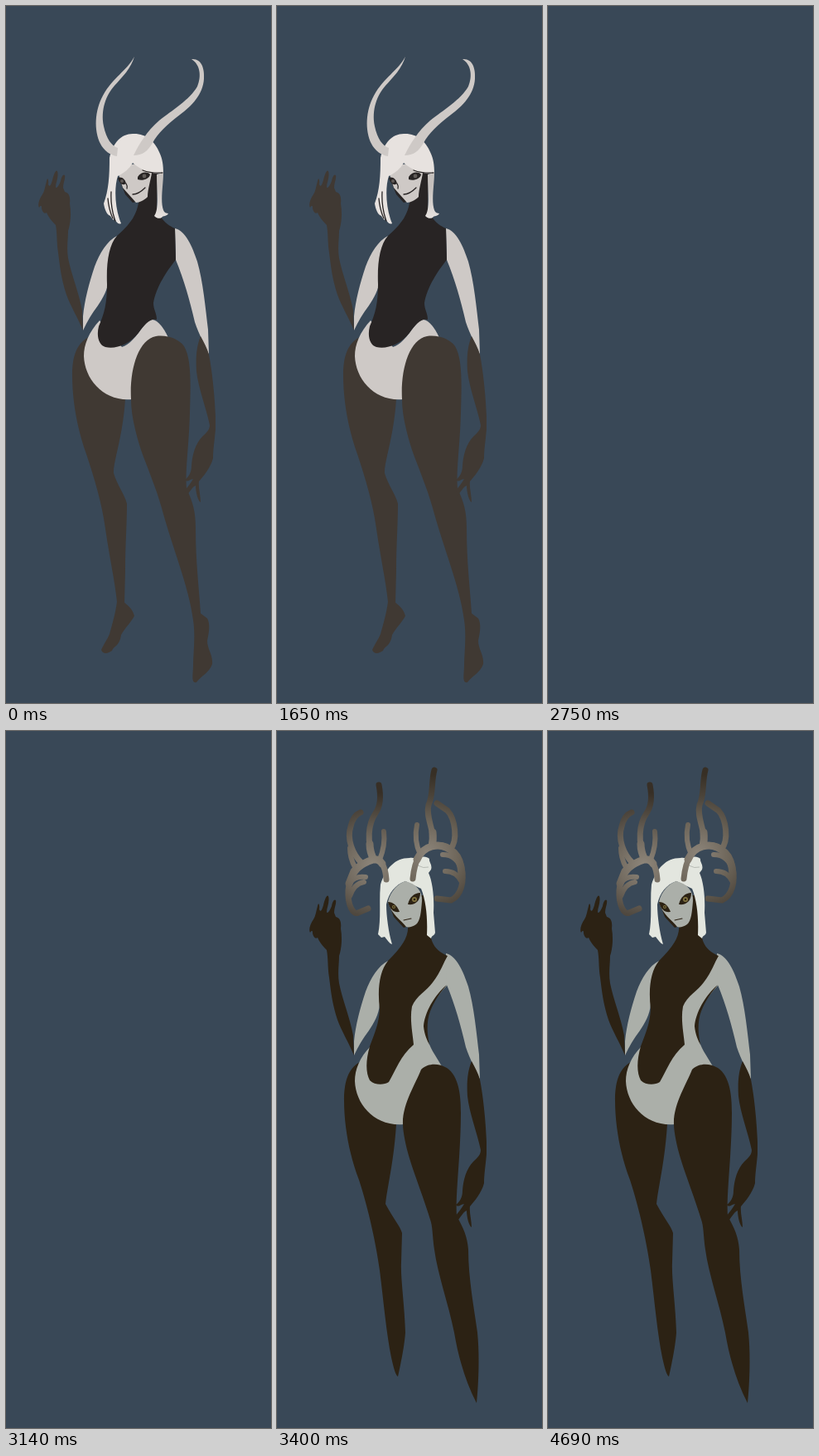
These frames come from a looping animation (320x840 px, 5550 ms). An HTML page:

```html
<!DOCTYPE html>
<html lang="en">
<head>
<meta charset="utf-8">
<title>Two forms</title>
<style>
  html, body { margin: 0; width: 100%; height: 100%; overflow: hidden; background: #394857; }
  svg { display: block; width: 100%; height: 100%; }
  .limb { fill: var(--limb); }
  .skin { fill: var(--skin); }
  .hair { fill: var(--hair); }
  .torso { fill: var(--torso); }
  .line { fill: none; stroke: var(--torso); stroke-linecap: round; }
  .horned {
    --limb: #403933; --skin: #cec9c6; --hair: #e7e2df; --torso: #282424;
    animation: first 5550ms step-end infinite;
  }
  .antlered {
    --limb: #2c2214; --skin: #abafa9; --hair: #e3e6df; --torso: #2c2214;
    animation: second 5550ms step-end infinite;
  }
  .antlers { fill: none; stroke-width: 7; stroke-linecap: round; stroke-linejoin: round; }
  .root { stroke-width: 9; }
  .twig { stroke-width: 6; }
  /* Hard cuts at 2750 ms and 3400 ms */
  @keyframes first { 0% { visibility: visible; } 49.5495%, 100% { visibility: hidden; } }
  @keyframes second { 0% { visibility: hidden; } 61.2613%, 100% { visibility: visible; } }
</style>
</head>
<body>
<svg viewBox="0 0 320 840">
  <defs>
    <g id="arms">
      <path class="skin" d="M134 277C122 283 113 298 107 314C100 335 95 354 93 374L93 391C98 380 104 370 111 361C117 352 123 342 124 329L130 290Z"/>
      <path class="limb" d="M93 391L92 367C88 345 79 324 75 304C73 292 75 280 75 271C78 262 79 250 77 238C78 230 76 225 71 224L69 219C69 213 72 208 71 204C69 202 67 206 66 211C64 216 61 221 60 218C60 213 64 206 62 199C60 196 57 205 56 210C54 216 53 219 51 215C52 210 50 205 49 211C47 218 47 222 44 227C40 233 38 239 40 243C42 240 43 240 43 244C44 248 46 251 49 249C51 254 55 259 60 264C62 275 61 285 63 297C65 314 67 330 73 348C78 362 87 376 93 391Z"/>
      <path class="skin" d="M204 268C217 271 225 290 231 308C238 332 241 365 244 390L245 420C240 408 233 396 228 381C222 355 215 330 205 306Z"/>
      <path class="limb" d="M235 398C239 405 243 413 245 420C249 440 252 470 253 495L253 510C252 522 250 535 250 545C247 557 238 567 233 573C232 580 235 590 235 598C232 597 229 586 229 578C225 579 222 586 218 590L216 584C219 580 223 575 226 570C222 570 219 575 216 571C221 567 224 562 224 554C225 540 229 527 237 519C244 513 246 509 246 505C242 485 232 460 230 440C229 424 230 410 235 398Z"/>
    </g>
    <radialGradient id="left" gradientUnits="userSpaceOnUse" cx="116" cy="162" r="88">
      <stop stop-color="#8f877b"/><stop offset=".35" stop-color="#746c61"/><stop offset=".7" stop-color="#504940"/><stop offset="1" stop-color="#372f26"/>
    </radialGradient>
    <radialGradient id="right" gradientUnits="userSpaceOnUse" cx="182" cy="148" r="96">
      <stop stop-color="#8d857a"/><stop offset=".4" stop-color="#6d6559"/><stop offset=".7" stop-color="#4d463c"/><stop offset="1" stop-color="#372f25"/>
    </radialGradient>
    <linearGradient id="lock" x2="0" y2="1">
      <stop offset=".3" stop-color="#c5c0bd"/><stop offset="1" stop-color="#e7e2df"/>
    </linearGradient>
  </defs>

  <g class="horned">
    <path class="limb" d="M100 399C84 407 80 425 80 445C80 475 86 510 97 540C107 570 116 600 120 630C125 665 131 690 134 718C132 733 128 746 125 757C122 764 117 771 115 776C117 782 124 780 128 777C130 771 137 772 139 758C143 750 151 743 155 735C153 727 148 723 143 719L144 680C144 650 146 625 146 600C144 590 134 577 130 563C129 550 141 520 144 474L150 440Z"/>
    <path class="skin" d="M113 379C100 393 94 408 94 422C95 450 118 477 152 474L190 410L197 402C192 390 184 378 176 378C165 380 158 405 140 411Z"/>
    <path class="limb" d="M151 474C149 440 159 402 181 398C196 396 209 402 215 410C224 425 223 455 222 490C221 530 216 560 218 582C226 598 229 610 229 630C229 670 233 700 235 732L243 738C247 745 245 755 243 765C243 775 250 782 249 793C246 803 235 808 230 815C223 817 226 805 226 795C226 780 229 760 226 740C221 700 200 650 188 605C181 580 170 555 163 535C155 510 151 490 151 474Z"/>
    <use href="#arms"/>
    <path class="torso" d="M161 228C160 245 156 258 134 277C124 288 121 310 122 335C122 358 119 370 112 386C109 398 112 409 120 411C132 414 149 408 160 394C167 384 174 376 182 378C182 370 178 366 178 358C181 339 195 318 205 306L204 268C194 264 186 256 182 243L183 200H168Z"/>
    <path fill="url(#lock)" d="M182 203L190 201C190 215 186 235 190 246C191 249 194 250 196 250C194 254 190 252 188 255C184 257 181 255 179 253C185 245 182 225 182 203Z"/>
    <path class="torso" d="M138 212L144 227L153 237L160 235L154 218Z"/>
    <path class="skin" d="M136 203C145 186 170 187 176 201C175 209 171 221 171 230C167 234 161 237 157 237C152 231 146 225 141 219Z"/>
    <g class="torso">
      <path d="M135 207C140 205 144 209 145 214C141 217 137 214 135 207Z"/>
      <path d="M159 206C163 200 170 199 174 203C173 209 164 211 159 209Z"/>
    </g>
    <g fill="#615c59"><circle cx="140" cy="211" r="2"/><circle cx="167" cy="205" r="2.4"/></g>
    <path class="line" stroke-width="1.3" d="M153 227C158 227 164 223 168 219M145 214Q147 217 146 220"/>
    <path class="hair" d="M125 183C129 165 139 154 153 154C168 153 180 163 185 176C189 184 190 192 190 202C177 203 163 198 153 189C149 196 143 201 135 205C130 220 132 246 139 262C136 264 132 260 130 254C131 260 129 258 126 253C122 252 119 245 118 238C124 222 125 205 125 183Z"/>
    <path class="line" stroke-width="1.3" d="M123 232Q124 245 129 256M127 224Q126 243 132 259M165 198Q176 202 189 201"/>
    <g class="skin">
      <path d="M155 61C146 78 129 86 117 108C107 126 106 150 114 166C118 174 126 180 134 181L135 171C128 169 121 160 118 145C114 125 121 107 131 96C141 85 151 75 155 61Z"/>
      <path d="M224 64C236 63 240 75 239 88C238 106 224 121 210 131C195 142 183 154 177 165C171 175 165 180 154 180C161 166 170 151 185 138C200 126 222 113 231 97C236 85 235 71 224 64Z"/>
    </g>
  </g>

  <g class="antlered">
    <path class="limb" d="M100 399C85 407 81 425 81 445C81 475 87 510 99 541C111 578 120 620 124 650C129 690 132 725 138 755C141 768 143 776 146 778C150 760 154 740 155 725C154 690 149 660 150 640L151 605C149 597 140 587 131 570C133 550 141 520 144 474L150 440Z"/>
    <path class="skin" d="M206 271L206 306C194 318 185 331 181 345C177 361 182 375 188 386L199 404L174 440L153 474C118 477 95 450 94 422C94 408 100 393 113 380L150 330Z"/>
    <path class="limb" d="M152 474C151 450 168 424 174 408C182 400 195 400 205 406C220 416 222 440 222 460C222 510 215 560 217 585C225 598 230 610 231 625C231 660 238 695 242 725C245 755 243 790 241 810C228 785 219 755 214 725C207 690 194 655 190 625C188 612 188 600 186 592C178 565 166 535 160 515C154 495 152 480 152 474Z"/>
    <use href="#arms"/>
    <path class="torso" d="M157 228C162 246 151 260 134 277C124 289 121 310 124 335C123 353 118 364 112 380C107 397 107 412 112 421C118 427 129 427 135 423C143 410 149 391 165 378C164 365 160 348 163 332C168 319 181 313 188 303C198 290 201 279 206 271C193 265 186 258 185 242L182 198H170Z"/>
    <path class="torso" d="M205 306C190 318 178 340 177 356C178 366 181 372 184 378C180 360 181 345 187 333C192 322 199 313 205 306Z"/>
    <path class="torso" d="M134 205L141 224L153 237L159 235L152 215Z"/>
    <path class="hair" d="M125 185C131 166 142 153 160 153C164 152 168 154 171 155C173 150 181 151 184 154C183 158 188 161 186 167L183 171C188 182 190 201 189 219L191 243C190 247 187 246 186 250L181 246C182 225 180 205 174 190L155 181C143 185 135 195 132 209C132 224 135 244 139 257C135 256 132 250 130 248L126 249L122 245C126 226 123 205 125 185Z"/>
    <path class="skin" d="M134 206C137 193 146 184 155 181C168 184 176 193 175 205C174 218 173 229 168 233C164 236 159 237 156 236C150 228 138 221 134 206Z"/>
    <path fill="none" stroke="#abafa9" stroke-width=".8" d="M170 162Q177 166 183 164M155 181Q149 184 146 188"/>
    <g class="torso">
      <path d="M134 206C140 206 145 210 148 218C141 219 136 215 134 206Z"/>
      <path d="M158 209C160 200 166 195 173 195C173 205 167 210 158 209Z"/>
    </g>
    <g fill="#817340"><circle cx="141" cy="212" r="2"/><circle cx="166" cy="203" r="3"/></g>
    <g class="torso"><circle cx="141" cy="212" r=".9"/><circle cx="166" cy="203" r="1.3"/></g>
    <path class="line" stroke-width="1.1" d="M153 228L162 226"/>
    <g class="antlers" stroke="url(#left)">
      <path d="M132 179C131 164 126 155 117 155C103 158 87 172 86 192C85 210 92 222 98 219L110 214"/>
      <path class="root" d="M127 160Q123 154 116 155Q102 159 93 169L87 184M117 155Q112 146 112 136"/>
      <path d="M117 155C108 133 110 112 119 99C126 89 125 75 123 65"/>
      <path d="M102 159C91 148 84 130 89 115C91 106 96 100 101 98"/>
      <path class="twig" d="M124 155Q131 138 129 121M88 141Q88 153 94 164M87 184Q94 174 107 176M88 199Q93 184 105 182"/>
    </g>
    <g class="antlers" stroke="url(#right)">
      <path d="M164 178C166 158 172 142 187 139C203 133 218 146 222 161C228 183 221 199 210 204L193 202"/>
      <path class="root" d="M169 155Q175 142 187 139Q202 135 214 147Q222 155 223 172M187 139Q189 131 188 122"/>
      <path d="M187 139C192 121 179 106 183 89C189 77 186 61 190 47"/>
      <path d="M209 143C219 132 215 106 206 96L193 87"/>
      <path class="twig" d="M173 149Q165 132 169 113M223 169Q218 149 200 149M223 182Q217 169 203 169"/>
    </g>
  </g>
</svg>
</body>
</html>
```
